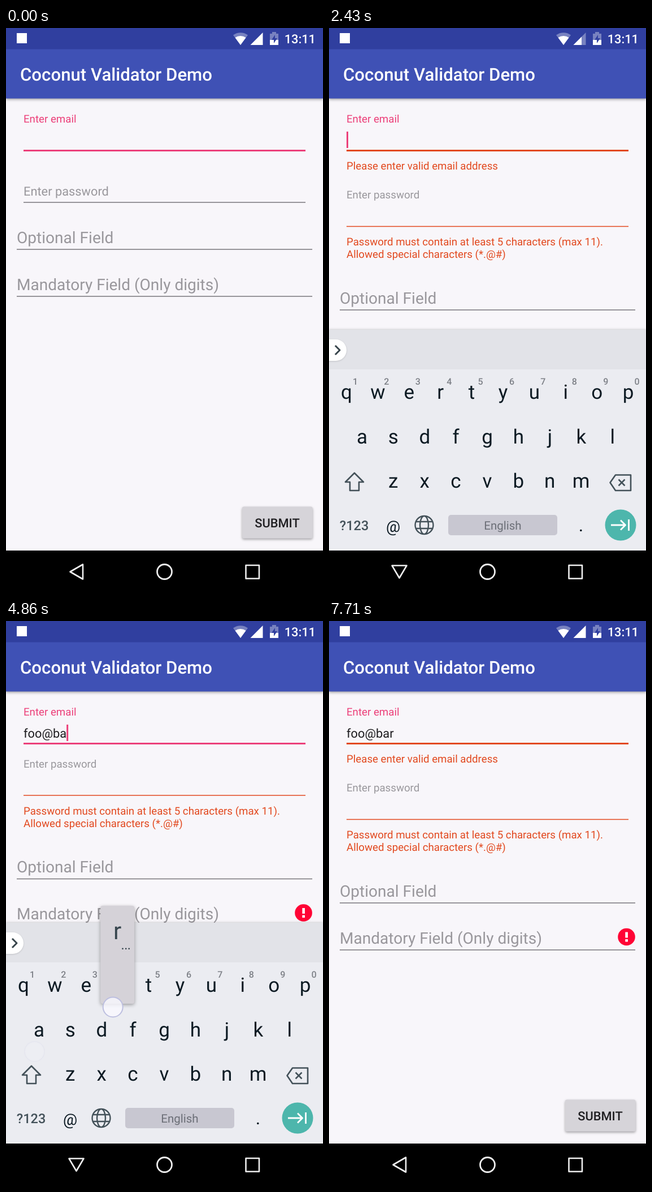
These frames come from a looping animation (561x998 px, 8 s). An HTML page with a canvas:

```html
<!DOCTYPE html>
<html lang="en">
<head>
<meta charset="utf-8">
<title>Form validation demo</title>
<style>
html, body { margin: 0; height: 100%; overflow: hidden; background: #f8f6fa; }
canvas { display: block; width: 100vw; height: 100vh; }
</style>
</head>
<body>
<canvas id="stage" width="561" height="998"></canvas>
<script>
const W = 561, H = 998, LOOP = 8000, FPS = 7;
const PINK = '#ec407a', ERROR = '#e2491f', HINT = '#99979c', INK = '#0c1a23', ICON = '#435159';
const stage = document.getElementById('stage').getContext('2d');
let ctx = stage;

const clamp = v => Math.max(0, Math.min(1, v));
const mix = (a, b, p) => a + (b - a) * p;

function text(str, x, y, size, color, weight = 400, align = 'left') {
  ctx.font = `${weight} ${size}px Roboto, sans-serif`;
  ctx.textRendering = 'geometricPrecision';
  ctx.textAlign = align;
  ctx.fillStyle = color;
  ctx.fillText(str, x, y);
}
function rect(x, y, w, h, color, radius = 0) {
  ctx.fillStyle = color;
  ctx.beginPath();
  ctx.roundRect(x, y, w, h, radius);
  ctx.fill();
}
function disc(x, y, r, color) {
  ctx.fillStyle = color;
  ctx.beginPath();
  ctx.arc(x, y, r, 0, 7);
  ctx.fill();
}
function path(d, color, width) {
  const shape = new Path2D(d);
  if (width) {
    ctx.strokeStyle = color;
    ctx.lineWidth = width;
    ctx.lineJoin = 'round';
    ctx.stroke(shape);
  } else {
    ctx.fillStyle = color;
    ctx.fill(shape);
  }
}
function withShadow(blur, dy, color, draw) {
  ctx.save();
  ctx.shadowBlur = blur;
  ctx.shadowOffsetY = dy;
  ctx.shadowColor = color;
  draw();
  ctx.restore();
}
function withAlpha(alpha, draw) {
  ctx.save();
  ctx.globalAlpha = alpha;
  draw();
  ctx.restore();
}

// Key centre x and text baseline by character
const keys = { '@': [113.5, 890] };
[['qwertyuiop', 31, 655], ['asdfghjkl', 58.5, 733.5], ['zxcvbnm', 113.7, 812]].forEach(
  ([row, x, y]) => [...row].forEach((c, i) => keys[c] = [x + i * 55.4, y]));

// Key presses: character, press step, release step
const presses = [['f', 19, 19], ['o', 21, 21], ['o', 23, 23], ['@', 26, 27],
                 ['b', 31, 31], ['a', 33, 33], ['r', 34, 34]];
const touches = [[480, 880, 4, 6], [290.5, 202, 12, 13], [125, 962, 43, 43], [480, 880, 49, 51],
  ...presses.map(([c, from, to]) => [keys[c][0] - 8, keys[c][1] + 27, from, to])];
const blinkStarts = [0.5, 15, ...presses.map(p => p[2] + 0.5)];

function drawKeyboard() {
  withShadow(4, -1, 'rgba(0,0,0,.25)', () => rect(0, 534, W, 389, '#ebecf1'));
  rect(0, 533, W, 70, '#e2e3e8');
  withShadow(3, 1, 'rgba(0,0,0,.15)', () => rect(-20, 550, 51, 38, '#fff', 19));
  path('M11 561l8 8-8 8', '#37444b', 3);
  for (const c in keys) text(c, ...keys[c], c === '@' ? 28 : 35, INK, 400, 'center');
  [...'1234567890'].forEach((d, i) =>
    text(d, 46.5 + i * 55.4, 629.5, 16, '#7d8087', 500, 'center'));

  path('M45 786L61 802H53V817H37V802H29Z', ICON, 2.6);
  path('M497.500 803L507 789.500H534V817H507ZM512.500 797.500l11 11m0-11l-11 11', ICON, 2.6);
  text('?123', 44.5, 887, 23.5, ICON, 500, 'center');
  path('M152.500 878a16 16 0 1 0 32 0a16 16 0 1 0-32 0M161 878a7.500 16 0 1 0 15 0a7.500 16 0 1 0-15 0M154 872h29M154 884h29', ICON, 2.4);
  rect(211, 860, 193, 36, '#c8c7d1', 5);
  text('English', 307.5, 886, 20.5, '#6c6f77', 400, 'center');
  text('.', 446, 889, 32, INK, 400, 'center');
  disc(516, 878, 27.5, '#4db6ac');
  path('M499 878H524M516 869.500l8.500 8.500-8.500 8.500M530.500 868V888', '#fff', 2.8);
}

const keyboard = document.createElement('canvas');
keyboard.width = W;
keyboard.height = H;
ctx = keyboard.getContext('2d');
drawKeyboard();
ctx = stage;

function drawBars(step) {
  withShadow(5, 1, 'rgba(0,0,0,.4)', () => rect(0, 0, W, 124.5, '#3f51b5'));
  rect(0, 0, W, 37.5, '#303f9f');
  text('Coconut Validator Demo', 25, 93, 31.17, '#fff', 500);
  rect(19, 9, 18, 18, '#fff');

  const faint = 'rgba(255,255,255,.35)';
  path('M415 30L402 12.500A22 22 0 0 1 428 12.500Z', faint);
  path('M415 30L405.500 17A17 17 0 0 1 424.500 17Z', '#fff');
  const weakSignal = step >= 6 && step < 28;
  path('M432.500 30L454.500 8V30Z', weakSignal ? faint : '#fff');
  if (weakSignal) path('M432.500 30L447 15.500V30Z', '#fff');
  path('M467 10h4v-3h7v3h4v20h-15Z', faint);
  rect(467, 21, 15, 9, '#fff');
  path('M476 12l-6 9h4v6l6-9h-4Z', '#303f9f');
  text('13:11', 548, 27, 21.82, '#fff', 500, 'right');
}

function drawForm(step, typed) {
  const failed = step >= 7, failedAgain = step >= 51;
  const mailError = (failed && step < 21) || failedAgain;
  const mailShift = mailError ? 42.5 : 0;
  const fieldShift = mailShift + (failed ? 64.5 : 0);
  const fadeIn = clamp((step - 6.4) / 1.6);
  const mailFade = failedAgain ? clamp((step - 50.4) / 1.6) : Math.min(fadeIn, clamp((21 - step) / 1.6));

  text('Enter email', 31, 166.7, 18.7, PINK);
  rect(31, 215, 499, 3, mailError && step !== 20 ? ERROR : PINK);
  text(typed, 31, 206, 21.82, '#1c1b1e');
  const end = 31 + ctx.measureText(typed).width;
  if (typed && !typed.includes('@')) rect(31, 207, end - 31, 1.5, '#1c1b1e');
  const blink = step - blinkStarts.filter(b => b <= step).pop();
  if (blink % 7 < 3.5) rect(end, 183, 3, 29, PINK);
  if (mailError) withAlpha(mailFade, () => text('Please enter valid email address', 31, 249.5, 18.7, ERROR));

  text('Enter password', 31, mix(296, 258.9, fadeIn) + mailShift, mix(21.82, 18.7, fadeIn), HINT);
  rect(31, 307.2 + mailShift, 499, 1.6, failed ? ERROR : '#77757a');
  withAlpha(fadeIn, () => {
    text('Password must contain at least 5 characters (max 11).', 31, 341.7 + mailShift, 18.7, ERROR);
    text('Allowed special characters (*.@#)', 31, 363.6 + mailShift, 18.7, ERROR);
  });

  ['Optional Field', 'Mandatory Field (Only digits)'].forEach((label, i) => {
    const y = 391 + i * 83 + fieldShift;
    text(label, 19, y - 11.5, 28.05, HINT);
    rect(19, y - 0.7, 523, 1.5, '#77757a');
  });
  if (failed) {
    const y = 451 + fieldShift;
    disc(526.5, y, 15.3, '#ff0435');
    rect(524.3, y - 8.5, 4.6, 10, '#fff');
    rect(524.3, y + 4, 4.6, 4.6, '#fff');
  }
}

function drawSubmit(step) {
  withShadow(4, 2, 'rgba(0,0,0,.35)', () => rect(418, 845.5, 124.5, 56, '#d6d4d9', 3));
  for (const start of [4, 49]) {
    const age = step - start;
    if (age < 0 || age > 3) continue;
    ctx.save();
    ctx.beginPath();
    ctx.roundRect(418, 845.5, 124.5, 56, 3);
    ctx.clip();
    disc(480, 880, 30 + age * 30, `rgba(0,0,0,${age > 2 ? 0.05 : 0.12})`);
    ctx.restore();
  }
  text('SUBMIT', 480, 882, 21.82, '#1f1e21', 500, 'center');
}

function drawNav(step) {
  const age = step - 42;
  if (age > 0 && age < 5) {
    const half = 84 * clamp(age / 3);
    rect(125 - half, 923, half * 2, 75, `rgba(255,255,255,${age > 3 ? 0.03 : 0.05})`, 37);
  }
  const down = step >= 14 && step < 45;
  path(down ? 'M111.500 949.500H137.500L124.500 971.500Z' : 'M136 947.500V973.500L113.500 960.500Z', '#eee', 2.6);
  path('M267.500 960.500a13 13 0 1 0 26 0a13 13 0 1 0-26 0Z', '#eee', 2.8);
  path('M424.500 949H448V972.500H424.500Z', '#eee', 2.6);
}

function drawPopup(char) {
  const [x, y] = keys[char];
  withShadow(6, 2, 'rgba(0,0,0,.35)', () => rect(x - 30, y - 152, 60, 173, '#d5d2d8', 4));
  text(char, x, y - 93, 42, '#37464e', 400, 'center');
  if (y < 700) text('...', x + 15, y - 75, 20, '#37464e', 500, 'center');
}

function drawTouch(x, y, alpha) {
  withAlpha(alpha, () => {
    disc(x, y, 17.5, 'rgba(250,249,255,.8)');
    ctx.strokeStyle = '#bdbfe0';
    ctx.lineWidth = 2;
    ctx.stroke();
  });
}

function draw(step) {
  const typed = presses.filter(p => p[2] < step).map(p => p[0]).join('');
  ctx.clearRect(0, 0, W, H);
  rect(0, 0, W, H, '#f8f6fa');
  drawForm(step, typed);
  drawSubmit(step);
  drawBars(step);
  rect(0, 923, W, 75, '#000');

  const hidden = step < 30 ? 1 - clamp((step - 14.5) / 2) : clamp((step - 43.885) / 1.26);
  if (hidden < 1) {
    withAlpha((1 - hidden) ** 0.8, () => ctx.drawImage(keyboard, 0, Math.round(78 * hidden)));
    if (!typed.includes('@')) text(typed, 278.5, 579, 27, '#6a6e74', 400, 'center');
  }
  drawNav(step);
  for (const [char, from, to] of presses) if (step >= from && step <= to) drawPopup(char);
  for (const [x, y, from, to] of touches)
    if (step >= from && step <= to + 1) drawTouch(x, y, step > to ? 0.13 : 1);
}

function tick() {
  const time = performance.now() % LOOP;
  draw(Math.floor((time + 4.3) * FPS / 1000) % (LOOP * FPS / 1000));
  requestAnimationFrame(tick);
}
tick();
</script>
</body>
</html>
```
